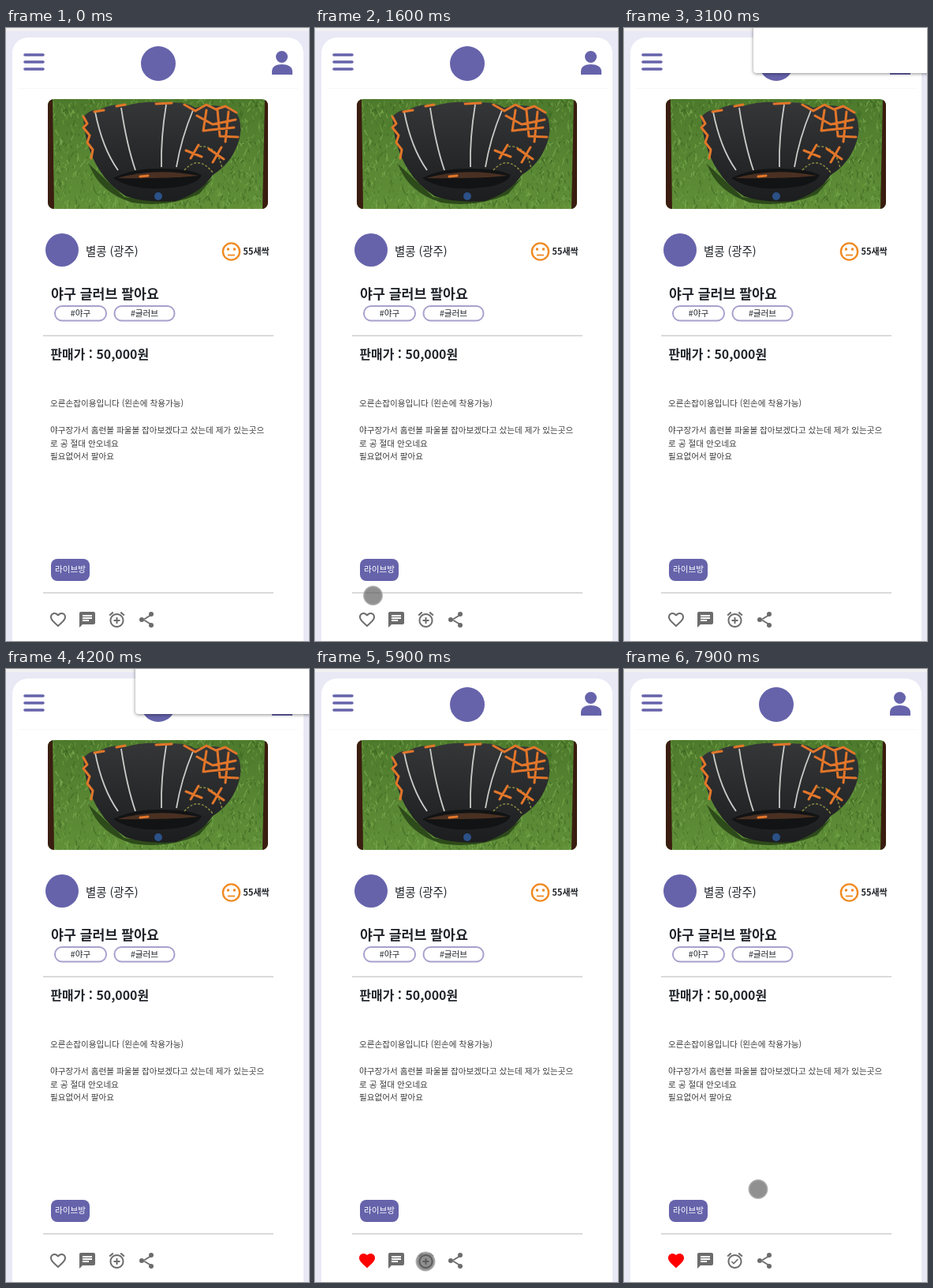
An HTML page that plays this animation: 384 px wide and 776 px high, repeating every 8000 ms.

```html
<!DOCTYPE html>
<html lang="ko">
<head>
<meta charset="utf-8">
<style>
html, body { margin: 0; width: 100%; height: 100%; overflow: hidden; background: #e9e8f5; }
svg { display: block; width: 100vw; height: 100vh; }
text { font-family: "Noto Sans CJK KR", "Noto Sans CJK JP", "Noto Sans CJK", sans-serif; fill: #20242a; }
.body text { font-size: 10.6px; fill: #3c3c3c; }
.tag rect { fill: #fff; stroke: #a8a0cd; stroke-width: 2; }
.tag text, .mid { text-anchor: middle; font-size: 10.6px; }
.icon { fill: #6c6c6c; }
.lace { fill: none; stroke: #e2762a; stroke-width: 3; stroke-linecap: round; stroke-linejoin: round; }
.seam { fill: none; stroke: #c9cbc8; stroke-width: 1.8; }
#alert rect { fill: #fff; filter: drop-shadow(0 1px 2px rgba(0,0,0,.45)); }
</style>
</head>
<body>
<svg viewBox="0 0 384 776">
  <defs>
    <clipPath id="frame"><rect x="53" y="90" width="279" height="139" rx="8"/></clipPath>
    <linearGradient id="grass" x2="0" y2="1">
      <stop offset="0" stop-color="#4d7a2c"/><stop offset="1" stop-color="#608f38"/>
    </linearGradient>
    <linearGradient id="hide" x2="0" y2="1">
      <stop offset="0" stop-color="#353637"/><stop offset="1" stop-color="#1c1d1f"/>
    </linearGradient>
  </defs>

  <rect width="384" height="776" fill="#e9e8f5"/>
  <rect width="384" height="4" fill="#f1f1f2"/>
  <rect x="8" y="12" width="369" height="800" rx="20" fill="#fff"/>
  <path d="M15 76.5H370" stroke="#f7f7f7"/>

  <g fill="#6663ab">
    <path d="M24 34H47M24 43H47M24 52H47" stroke="#6663ab" stroke-width="3.6" stroke-linecap="round"/>
    <circle cx="193" cy="45" r="22"/>
    <circle cx="71" cy="281" r="21"/>
    <circle cx="349.5" cy="36.500" r="7.500"/>
    <path d="M337 59V55C337 49 342 46 349.500 46S363 49 363 55V59Z"/>
  </g>

  <g clip-path="url(#frame)">
    <rect x="53" y="90" width="279" height="139" fill="url(#grass)"/>
    <g id="blades" fill="none" stroke-width="1.300"/>
    <path d="M53 90H59L61 229H53ZM332 90H328L325 229H332Z" fill="#3a1d10"/>
    <path d="M105 172Q118 208 160 221Q205 228 245 210L262 190Q220 225 150 214Z" fill="#2d4a1a"/>
    <path d="M98 112Q108 102 118 104Q136 94 150 99Q176 91 204 95Q226 92 240 101Q268 93 291 106Q302 122 294 146Q285 172 262 186Q248 208 215 219Q178 222 152 213Q130 199 118 179Q100 151 98 112Z" fill="url(#hide)"/>
    <path d="M136 190Q160 178 192 178Q230 177 248 186Q242 201 198 203Q158 205 136 190Z" fill="#121314"/>
    <path d="M141 190Q190 176 244 187Q200 191 141 190Z" fill="#4a3022"/>
    <path class="seam" d="M113 106Q122 152 142 180M146 101Q153 148 164 180M203 97Q196 140 197 176M237 104Q222 140 216 176"/>
    <path d="M226 180Q244 160 262 183M245 150Q268 148 274 178" fill="none" stroke="#8a8a42" stroke-width="1.500" stroke-dasharray="3 2"/>
    <path class="lace" d="M98 112L103 121L98 126L106 136L103 145L110 154L108 165M112 106L124 104M140 99L151 97M190 96L210 95M226 97L240 105L254 97L266 103L278 99L292 107M242 111L262 122L291 116M254 104L250 130L289 126M268 104L271 137L294 138M282 106L278 144M228 155L248 163M244 148L234 165M257 153L276 166M273 151L262 170M170 188L180 187"/>
    <circle cx="193" cy="213" r="5" fill="#2b5187"/>
  </g>

  <text x="101" y="288" font-size="14.400" font-weight="500">별콩 (광주)</text>
  <g fill="none" stroke="#ef8a22" stroke-width="2.400">
    <circle cx="285.500" cy="283" r="10.600"/>
    <path d="M281 287.500H290" stroke-width="1.800"/>
    <path d="M281.500 278.500V281.500M289.500 278.500V281.500" stroke-width="3"/>
  </g>
  <text x="300.500" y="287" font-size="11" font-weight="700">55새싹</text>

  <text x="57" y="343" font-size="17.300" font-weight="700">야구 글러브 팔아요</text>
  <g class="tag">
    <rect x="62" y="352" width="65" height="18.500" rx="9"/><text x="94.500" y="365">#야구</text>
    <rect x="137.500" y="352" width="76" height="18.500" rx="9"/><text x="175.500" y="365">#글러브</text>
  </g>
  <path d="M47 389.500H339M47 715H339" stroke="#cecece" stroke-width="1.500"/>
  <text x="56.500" y="419" font-size="15.900" font-weight="700">판매가 : 50,000원</text>
  <g class="body">
    <text x="56" y="479">오른손잡이용입니다 (왼손에 착용가능)</text>
    <text x="56" y="513">야구장가서 홈런볼 파울볼 잡아보겠다고 샀는데 제가 있는곳으</text>
    <text x="56" y="530">로 공 절대 안오네요</text>
    <text x="56" y="546">필요없어서 팔아요</text>
  </g>
  <rect x="57" y="672" width="49" height="28" rx="8" fill="#6663ab"/>
  <text class="mid" x="81.500" y="689" style="fill:#fff">라이브방</text>

  <g class="icon">
    <path id="heart" transform="translate(54 737)"/>
    <path transform="translate(91 737)" d="M20 2H4c-1.100 0-1.990.9-1.990 2L2 22l4-4h14c1.100 0 2-.9 2-2V4c0-1.100-.9-2-2-2zM6 9h12v2H6V9zm8 5H6v-2h8v2zm4-6H6V6h12v2z"/>
    <path id="alarm" transform="translate(128.500 737)"/>
    <path transform="translate(166 737)" d="M8 11L17 5.500L18 7L9 12.500ZM8 13L17 18.500L18 17L9 11.500Z"/>
    <circle cx="172" cy="749" r="3"/><circle cx="184" cy="742" r="3"/><circle cx="184" cy="756" r="3"/>
  </g>

  <circle id="touch" r="11.500" fill="rgba(85,85,85,.65)" stroke="rgba(160,160,160,.75)" stroke-width="2"/>
  <g id="alert"><rect x="164" y="-30" width="240" height="87" rx="4"/></g>
</svg>
<script>
const LOOP = 8000, STEP = 100;
const $ = id => document.getElementById(id);

const heartEdge = "M12 21.35l-1.45-1.32C5.4 15.36 2 12.28 2 8.5 2 5.42 4.42 3 7.5 3c1.74 0 3.41.81 4.5 2.09C13.09 3.81 14.76 3 16.5 3 19.58 3 22 5.42 22 8.5c0 3.78-3.4 6.86-8.55 11.54L12 21.35z";
const heartHole = "M12.1 18.55l-.1.1-.1-.1C7.14 14.24 4 11.39 4 8.5 4 6.5 5.5 5 7.5 5c1.54 0 3.04.99 3.57 2.36h1.87C13.46 5.99 14.96 5 16.5 5c2 0 3.5 1.5 3.5 3.5 0 2.89-3.14 5.74-7.9 10.05z";
const clock = "M7.88 3.39L6.6 1.86 2 5.71l1.29 1.53 4.59-3.85zM22 5.72l-4.6-3.86-1.29 1.53 4.6 3.86L22 5.72zM12 4c-4.97 0-9 4.03-9 9s4.02 9 9 9c4.97 0 9-4.03 9-9s-4.03-9-9-9zm0 16c-3.87 0-7-3.13-7-7s3.13-7 7-7 7 3.13 7 7-3.13 7-7 7z";
const plus = "M13 9h-2v3H8v2h3v3h2v-3h3v-2h-3V9z";
const check = "M10.54 14.53L8.41 12.4l-1.06 1.06 3.18 3.18 6-6-1.06-1.06-4.93 4.95z";

// time, x, y, opacity
const touchKeys = [
  [0, 345, -20, 0], [100, 345, -6, 1], [900, 190, 500, 1], [1600, 73.5, 718.5, 1],
  [1800, 66, 748, 1], [2300, 66, 748, 1], [2400, 66, 748, .55], [2900, 66, 748, 0],
  [4400, 345, 40, 0], [4500, 330, 110, 1], [4900, 120, 700, 1], [5000, 100, 755, .6],
  [5200, 103, 756, 1], [5500, 118, 754, 1], [5800, 140, 750, 1], [6200, 140, 750, 1],
  [6300, 140, 750, .55], [6700, 140, 750, 0], [7500, 345, 40, 0], [7600, 318, 130, 1],
  [7900, 170, 658.5, 1], [8000, 165, 670, 1]
];
// time, visibility
const alertKeys = [
  [0, 0], [2300, 0], [2400, .55], [2500, 1], [4200, 1], [4400, 0],
  [6200, 0], [6300, .55], [6400, 1], [7300, 1], [7500, 0], [8000, 0]
];

function at(keys, t) {
  const i = Math.max(1, keys.findIndex(k => k[0] >= t));
  const a = keys[i - 1], b = keys[i], f = (t - a[0]) / (b[0] - a[0]);
  return a.slice(1).map((v, j) => v + (b[j + 1] - v) * f);
}

function growGrass() {
  let seed = 7;
  const rnd = () => (seed = seed * 16807 % 2147483647) / 2147483647;
  const tones = ["#365f1e", "#48762a", "#6fa043", "#83b457"];
  $("blades").innerHTML = tones.map(tone => {
    let d = "";
    for (let i = 0; i < 330; i++)
      d += `M${(53 + rnd() * 279).toFixed(1)} ${(88 + rnd() * 141).toFixed(1)}l${(rnd() * 8 - 4).toFixed(1)} ${(2 + rnd() * 5).toFixed(1)}`;
    return `<path d="${d}" stroke="${tone}" opacity=".6"/>`;
  }).join("");
}

function draw(t) {
  const [x, y, alpha] = at(touchKeys, t);
  const [shown] = at(alertKeys, t);
  const liked = t >= 4400, alarmed = t >= 7500;
  $("touch").setAttribute("transform", `translate(${x} ${y})`);
  $("touch").setAttribute("opacity", alpha);
  $("alert").setAttribute("transform", `translate(0 ${(shown - 1) * 20})`);
  $("alert").setAttribute("opacity", shown);
  $("heart").setAttribute("d", liked ? heartEdge : heartEdge + heartHole);
  $("heart").setAttribute("fill-rule", "evenodd");
  $("heart").style.fill = liked ? "#f00" : "";
  $("alarm").setAttribute("d", clock + (alarmed ? check : plus));
}

growGrass();
const start = performance.now();
function tick() {
  const t = (performance.now() - start) % LOOP;
  draw(Math.floor(t / STEP) * STEP);
  requestAnimationFrame(tick);
}
tick();
</script>
</body>
</html>
```
